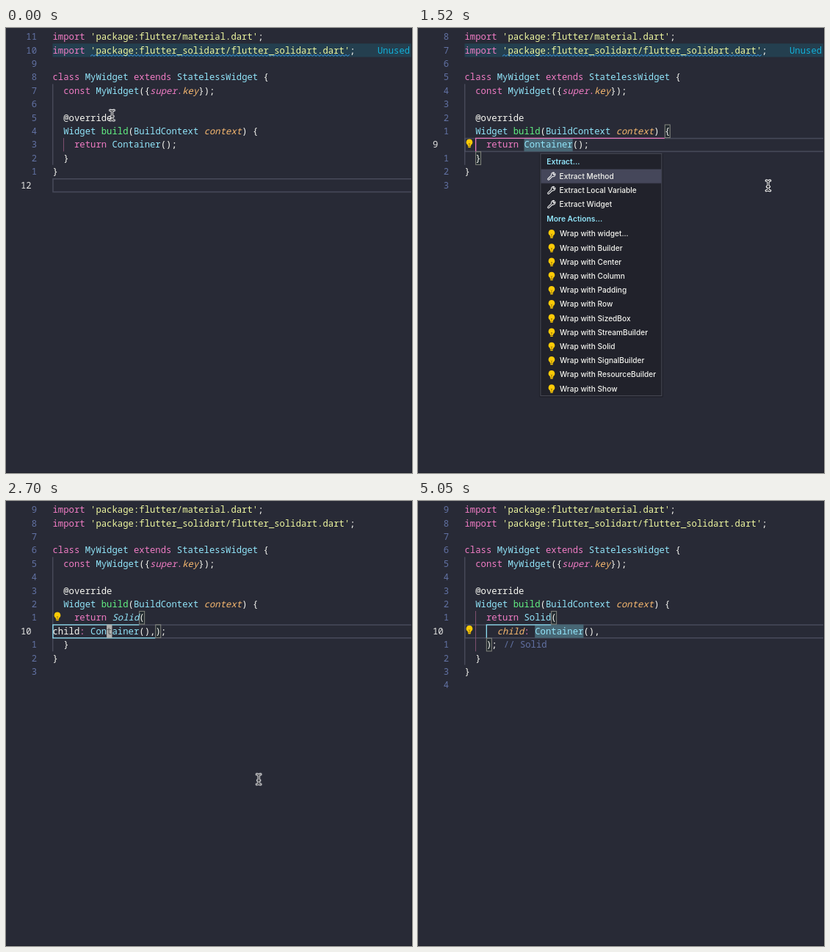
Write an HTML page that moves like this. It is 553x607 px and loops after 5080 ms.

```html
<!DOCTYPE html>
<html lang="en">
<head>
<meta charset="utf-8">
<title>Wrap with Solid</title>
<style>
html, body { margin: 0; width: 100%; height: 100%; overflow: hidden; background: #282a36; }
svg { display: block; }
text { white-space: pre; }
.code { font: 500 12.27px "Noto Sans Mono", "DejaVu Sans Mono", monospace; }
.w { fill: #f8f8f2; }
.p { fill: #f07cc4; }
.c { fill: #92e6fb; }
.y { fill: #eff8a0; }
.g { fill: #62f183; }
.o { fill: #f8b970; }
.m { fill: #6272a4; }
.d { fill: #5a5a58; }
.i { font-style: italic; }
.num { fill: #6272a4; font-weight: 400; text-anchor: end; }
.now { fill: #e4e4e2; }
.lens { fill: #12b0d8; font-weight: 400; }
.strip { fill: #243f4f; }
.line { fill: none; stroke: #464959; stroke-width: 1.6; }
.guide { stroke: #555869; }
.pair { stroke: #81516f; }
.active { fill: none; stroke: #e877bd; stroke-width: 1.3; }
.active.blue { stroke: #8cdff3; }
.bracket { fill: #0640061a; stroke: #85877f; }
.word { fill: #476674; }
.block { fill: #aeafad; }
.menu text { font: 500 10.15px Inter, "Open Sans", sans-serif; fill: #f4f4ef; }
.menu text.head { font-size: 10.3px; font-weight: 600; fill: #92e6fb; }
.beam path { fill: none; stroke: #fff; stroke-width: 3.2; stroke-linecap: round; }
.beam path + path { stroke: #14151b; stroke-width: 1.1; }

/* one 5.08 s loop for everything */
.scene, .late, .caret, .menu, .hover, .mouse, .beam, .hand {
  animation: 5.08s step-end infinite;
}
#idle { animation-name: idle; }
#picked { animation-name: picked; }
#wrapped { animation-name: wrapped; }
#tidy { animation-name: tidy; }
.late { animation-name: late; }
.caret { animation-name: blink; }
.menu { animation-name: menu; }
.hover { animation-name: hover; }
.beam { animation-name: beam; }
.hand { animation-name: hand; }
.mouse { animation-name: mouse; animation-timing-function: ease-in-out; }

@keyframes idle { 0% { opacity: 1 } 7.87%, to { opacity: 0 } }
@keyframes picked { 0% { opacity: 0 } 7.87% { opacity: 1 } 52.36%, to { opacity: 0 } }
@keyframes wrapped { 0% { opacity: 0 } 52.36% { opacity: 1 } 68.5%, to { opacity: 0 } }
@keyframes tidy { 0% { opacity: 0 } 68.5%, to { opacity: 1 } }
@keyframes late { 0% { opacity: 0 } 12.6%, to { opacity: 1 } }
@keyframes blink {
  0% { opacity: 0 } 7.87% { opacity: 1 } 17.72% { opacity: 0 }
  52.36% { opacity: 1 } 62.2% { opacity: 0 } 68.5% { opacity: 1 }
  78.35% { opacity: 0 } 88.19% { opacity: 1 } 98.03%, to { opacity: 0 }
}
@keyframes menu { 0% { opacity: 0 } 27.56% { opacity: 1 } 50%, to { opacity: 0 } }
@keyframes hover {
  0% { transform: translateY(192.6px) }
  36.8% { transform: translateY(328.6px) }
  37.5% { transform: translateY(347.8px) }
  39.2% { transform: translateY(367px) }
  40.4% { transform: translateY(386.2px) }
  41.7% { transform: translateY(405.4px) }
  44%, to { transform: translateY(424.6px) }
}
@keyframes beam { 0% { opacity: 1 } 36.8% { opacity: 0 } 48.8%, to { opacity: 1 } }
@keyframes hand { 0% { opacity: 0 } 36.8% { opacity: 1 } 48.8%, to { opacity: 0 } }
@keyframes mouse {
  0% { transform: translate(144.5px, 119px) }
  6.7%, 11% { transform: translate(170px, 160px) }
  19.7%, 30.7% { transform: translate(477px, 215px); animation-timing-function: ease-in }
  38.19% { transform: translate(312px, 355px); animation-timing-function: ease-out }
  46.5%, 50% { transform: translate(269px, 427px); animation-timing-function: ease-in }
  53.15% { transform: translate(344px, 380px); animation-timing-function: ease-out }
  61%, 85.4% { transform: translate(397px, 286px); animation-timing-function: ease-in }
  89.8%, to { transform: translate(388px, -14px) }
}
</style>
</head>
<body>
<svg id="stage" width="553" height="607">
  <defs>
    <g id="bulb">
      <path d="M0-5.4a4.3 4.3 0 0 0-2.2 8V4.2H2.2V2.6A4.3 4.3 0 0 0 0-5.4z" fill="#ffcb06"/>
      <path d="M-1.7 5.4h3.4" stroke="#ffcb06" stroke-width="1.5"/>
      <path d="M-1 .2L0 1.2L1 .2M0 1.2V3.4" fill="none" stroke="#6b5510" stroke-width=".7"/>
    </g>
    <path id="wrench" d="M-5 3.5L-.4-1A3.1 3.1 0 0 1 3.6-4.8L1.8-3L3-1.6L4.8-3.4A3.1 3.1 0 0 1 1 .6L-3.6 5A1 1 0 0 1-5 3.5z" fill="none" stroke="#eee" stroke-width="1.1" stroke-linejoin="round"/>
  </defs>
</svg>
<script>
(() => {
const CW = 7.362, X0 = 63.5, PITCH = 18.4;
const col = n => X0 + n * CW;
const mid = row => 12 + row * PITCH;
const rowTop = row => mid(row) - PITCH / 2;

const rect = (cls, x, y, w, h) => `<rect class="${cls}" x="${x}" y="${y}" width="${w}" height="${h}"/>`;
const path = (cls, d) => `<path class="${cls}" d="${d}"/>`;
const text = (cls, x, row, body) => `<text class="code ${cls}" x="${x}" y="${mid(row) + 4.2}">${body}</text>`;
const bulb = (x, y) => `<use href="#bulb" x="${x}" y="${y}"/>`;

// "p:import |w:;" : class letter, coloured text; a capital letter means italic
const paint = src => src.split('|').map(tok => {
  const k = tok[0], low = k.toLowerCase();
  return `<tspan class="${low}${k === low ? '' : ' i'}">${tok.slice(2)}</tspan>`;
}).join('');

const head = [
  "p:import |y:'package:flutter/material.dart'|w:;",
  "p:import |y:'package:flutter_solidart/flutter_solidart.dart'|w:;",
  '',
  'p:class |c:MyWidget |p:extends |c:StatelessWidget |w:{',
  'p:  const |c:MyWidget|w:({|P:super|p:.|O:key|w:});',
  '',
  'w:  @override',
  'c:  Widget |g:build|w:(|c:BuildContext |O:context|w:) {'
];
const plain = [...head, 'p:    return |c:Container|w:();', 'w:  }', 'w:}', ''];
const raw = [...head, 'p:    return |C:Solid|w:(', 'w:child|p:: |c:Container|w:(),);', 'w:  }', 'w:}', ''];
const neat = [...head, 'p:    return |c:Solid|w:(', 'O:      child|p:: |c:Container|w:(),', 'w:    );', 'w:  }', 'w:}', ''];

const code = (lines, now) => lines.map((src, i) =>
  (src ? text('', X0, i, paint(src)) : '') +
  (i === now ? text('now', 20, i, i + 1) : text('num', 42, i, Math.abs(i - now)))
).join('');

const lineBox = row => rect('line', 64, rowTop(row) + .6, 600, PITCH - .6);
const guide = (cls, n, from, to) => path(cls, `M${col(n) + .3} ${rowTop(from)}V${rowTop(to)}`);
const bracket = (n, row) => rect('bracket', col(n) + .4, rowTop(row) + .4, CW - .4, PITCH - .8);
const word = (n, row) => rect('word', col(n), rowTop(row), CW * 9, PITCH);
const caret = (n, row) =>
  `<g class="caret">${rect('block', col(n), rowTop(row), CW, PITCH)}${text('d', col(n), row, 't')}</g>`;

function unused() {
  let d = `M${col(7)} 38.4`;
  for (let x = col(7), up = 1; x < col(55) - 2; up ^= 1) d += `L${x += 2.4} ${up ? 36.4 : 38.4}`;
  return rect('strip', X0, rowTop(1), 490, PITCH) +
    `<path d="${d}" fill="none" stroke="#3a9df0"/>` +
    text('lens', 506, 1, 'Unused import');
}

function menu() {
  const label = (cls, x, y, s) => `<text class="${cls}" x="${x}" y="${y + 3.6}">${s}</text>`;
  const tools = ['Method', 'Local Variable', 'Widget'];
  const wraps = ['widget...', 'Builder', 'Center', 'Column', 'Padding', 'Row', 'SizedBox',
    'StreamBuilder', 'Solid', 'SignalBuilder', 'ResourceBuilder', 'Show'];
  return '<g class="menu">' +
    '<rect x="165" y="171" width="169" height="333" rx="2" fill="#0003"/>' +
    '<rect x="166.9" y="171.3" width="165" height="330.4" fill="#21222b" stroke="#4a4c57"/>' +
    '<rect class="hover" x="167.5" y="0" width="164" height="19.2" fill="#45475a"/>' +
    label('head', 175.3, 182, 'Extract...') + label('head', 175.3, 260.5, 'More Actions...') +
    tools.map((s, i) => `<use href="#wrench" x="182" y="${202 + i * 19.2}"/>` +
      label('', 192.6, 202.2 + i * 19.2, 'Extract ' + s)).join('') +
    wraps.map((s, i) => bulb(182, 280.5 + i * 19.2) +
      label('', 193, 280.7 + i * 19.2, 'Wrap with ' + s)).join('') + '</g>';
}

const scene = (id, body) => `<g class="scene" id="${id}">${body}</g>`;
const beam = 'M-2.8-6.8Q0-6.8 0-4.8Q0-6.8 2.8-6.8M0-4.8V4.8M-2.8 6.8Q0 6.8 0 4.8Q0 6.8 2.8 6.8M-1.6 1.4H1.6';
const hand = 'M-2.2-5.2q1.4-1.2 2.2.6L.8-1.4Q2.2-2.4 2.8-.8Q4.2-1.6 4.6.2Q6-.2 5.8 1.6Q5.8 4 4.6 5.6V7.4H-1.2Q-1.6 5.6-4 3.4Q-5.4 1.8-4.2 1.2Q-3 .8-1.6 2.4L-2.8-3.6Q-3-4.8-2.2-5.2z';

document.getElementById('stage').insertAdjacentHTML('beforeend',
  '<rect width="553" height="607" fill="#282a36"/>' +
  scene('idle', unused() + lineBox(11) + guide('guide', 0, 4, 10) + guide('pair', 2, 8, 9) + code(plain, 11)) +
  scene('picked', unused() + lineBox(8) + guide('guide', 0, 4, 10) +
    `<g class="late">${word(11, 8)}${bulb(70, 157)}</g>` +
    path('active', `M${col(37)} ${rowTop(8) + .4}H${col(2) + .4}V${rowTop(9)}`) +
    bracket(37, 7) + bracket(2, 9) + code(plain, 8) + caret(14, 8) + menu()) +
  scene('wrapped', lineBox(9) + guide('guide', 0, 4, 11) + bulb(70, 157) +
    path('active blue', `M${col(16)} ${rowTop(9) + .4}H${X0 + .4}V${rowTop(10)}H${col(19)}`) +
    bracket(16, 8) + bracket(19, 9) + code(raw, 9) + caret(10, 9)) +
  scene('tidy', lineBox(9) + guide('guide', 0, 4, 12) + guide('pair', 2, 8, 11) +
    bulb(70, 175.2) + word(13, 9) +
    path('active blue', `M${col(16)} ${rowTop(9) + .4}H${col(4) + .4}V${rowTop(10)}`) +
    bracket(16, 8) + bracket(4, 10) + code(neat, 9) + text('m', 116.8, 10, '// Solid') + caret(16, 9)) +
  '<path d="M552.5 0V606.5H0" fill="none" stroke="#1f212b"/>' +
  `<g class="mouse"><g class="beam"><path d="${beam}"/><path d="${beam}"/></g>` +
  `<g class="hand"><path d="${hand}" transform="translate(0 2)" fill="#fff" stroke="#15161c" stroke-width=".9"/></g></g>`);
})();
</script>
</body>
</html>
```
